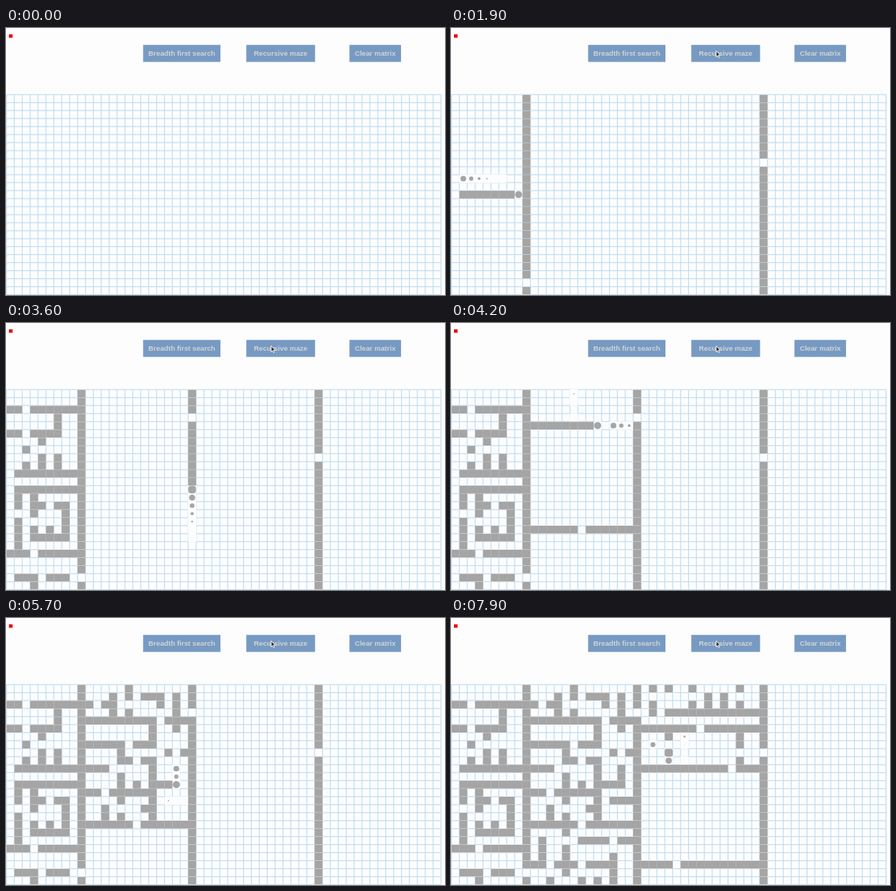
These frames come from a looping animation (600x366 px, 8000 ms). An HTML page:

```html
<!DOCTYPE html>
<html lang="en">
<head>
<meta charset="utf-8">
<title>Recursive maze</title>
<style>
  html, body { margin: 0; width: 100%; height: 100%; overflow: hidden; background: #fdfdfe; }
  svg { display: block; width: 600px; height: 366px; }
  text { font: bold 9.7px "Liberation Sans", Arial, sans-serif; fill: #d2d3d5; text-anchor: middle; }
</style>
</head>
<body>
<svg id="stage" viewBox="0 0 600 366">
  <rect width="600" height="366" fill="#fdfdfe"/>
  <rect x="4" y="8.6" width="5" height="4.8" fill="#f00808"/>
  <g id="buttons"></g>
  <path id="grid" fill="none" stroke="#c1def3" stroke-width="1.25"/>
  <g id="blanks" fill="#fdfdfe"></g>
  <g id="walls" fill="#a5a5a5"></g>
  <path id="cursor" d="M362.3 31.2v8.4l1.9-1.7 1.3 2.8 1.3-.6-1.3-2.7h2.5z"
        fill="#333" stroke="#fff" stroke-width=".9"/>
</svg>
<script>
const LOOP = 8000, STEP = 100, START = 700;
const COLS = 55, ROWS = 25, W = 10.8, H = 10.97, X0 = 0.6, Y0 = 91.3;
const $ = id => document.getElementById(id);

function add(parent, tag, attrs, text) {
  const el = document.createElementNS("http://www.w3.org/2000/svg", tag);
  for (const k in attrs) el.setAttribute(k, attrs[k]);
  if (text) el.textContent = text;
  return parent.appendChild(el);
}

function button(x, width, label) {
  add($("buttons"), "rect", { x, y: 23.2, width, height: 23.3, fill: "#779ac2" });
  add($("buttons"), "text", { x: x + width / 2, y: 38 }, label);
}
button(187.4, 105.7, "Breadth first search");
button(328.4, 94, "Recursive maze");
button(469.4, 70.5, "Clear matrix");

let lines = "";
for (let c = 0; c <= COLS; c++) lines += `M${X0 + c * W} ${Y0}v${ROWS * H}`;
for (let r = 0; r <= ROWS; r++) lines += `M${X0} ${Y0 + r * H}h${COLS * W}`;
$("grid").setAttribute("d", lines);

// Walls in the order they are built; trailing arguments are the gaps.
const cells = [];
const span = (a, b, gaps, put) => {
  for (let i = a; i <= b; i++) if (!gaps.includes(i)) cells.push(put(i));
};
const v = (col, a, b, ...gaps) => span(a, b, gaps, row => [col, row]);
const h = (row, a, b, ...gaps) => span(a, b, gaps, col => [col, row]);
const dot = (col, row) => cells.push([col, row]);
const pause = () => cells.push(null);

v(39, 0, 24, 8);
v(9, 0, 24, 23);

// Left, upper part
h(12, 0, 8, 0);
h(10, 0, 8, 0);
h(2, 0, 8, 2);
v(6, 3, 9, 6, 7);
h(5, 0, 5, 2);
v(4, 6, 9, 7);
v(2, 7, 9, 8);

// Left, lower part
h(20, 0, 8, 3);
v(1, 13, 19, 15);
v(3, 13, 18, 16);
h(18, 4, 7);
v(7, 14, 17);
h(14, 4, 6, 5);
dot(5, 17);
h(23, 1, 7, 4);
dot(3, 24);

// Middle, top
v(23, 0, 24, 3);
h(17, 10, 22, 16);
h(4, 10, 22, 19);
v(15, 0, 3, 2);
h(2, 10, 13, 11);
v(13, 1, 3, 2);
h(1, 17, 19);
dot(19, 2);
v(21, 1, 3);

// Middle, centre
v(18, 5, 16, 8);
h(7, 10, 17, 15);
v(14, 8, 12, 10);
h(10, 10, 12);
h(9, 15, 17, 16);
dot(16, 12);
h(13, 10, 17, 12);
v(14, 14, 16, 15);
v(12, 15, 16);
dot(17, 15);
h(8, 20, 22, 21);
dot(21, 5);
h(12, 19, 21);
v(21, 10, 11);
pause();
h(14, 20, 22);

// Middle, bottom
h(22, 10, 20, 12, 16);
dot(12, 24);
dot(14, 23);
dot(16, 24);
dot(18, 24);
v(20, 23, 24);
v(14, 18, 21, 19);
h(19, 16, 22, 20);
dot(20, 21);
v(11, 19, 21);

// Right
h(22, 24, 38, 28);
h(10, 24, 38, 35);
h(5, 24, 38, 31);
h(3, 25, 38, 26);
v(25, 0, 2, 1);
dot(27, 0);
v(30, 0, 2, 1);
v(32, 1, 2);
v(34, 1, 2);
v(36, 0, 2, 1);
v(36, 6, 9, 8);
v(27, 6, 9, 7);
dot(25, 7);
pause();
v(29, 6, 9, 8);

const parts = cells.map(cell => {
  if (!cell) return null;
  const x = X0 + cell[0] * W, y = Y0 + cell[1] * H;
  return {
    x: x + W / 2, y: y + H / 2,
    blank: add($("blanks"), "rect", { x: x - 0.3, y: y - 0.3, width: W + 0.6, height: H + 0.6 }),
    wall: add($("walls"), "rect", {})
  };
});

// Pace of building: [ms, newest visible cell]
const pace = [[START, 1], [1900, 60], [2900, 108], [3300, 124], [4200, 173],
              [5700, 237], [6600, 279], [7900, 342.5], [LOOP, 347]];

function newest(t) {
  if (t < START) return -9;
  const i = pace.findIndex(p => t < p[0]);
  const [t0, n0] = pace[i - 1], [t1, n1] = pace[i];
  return n0 + (n1 - n0) * (t - t0) / (t1 - t0);
}

function drawCell(p, age) {
  p.blank.style.display = age >= -2.5 ? "" : "none";
  const shown = age > -0.8;
  p.wall.style.display = shown ? "" : "none";
  if (!shown) return;
  const size = Math.min(1, (0.9 + age) / 5.4);
  const w = W * size + (size === 1 ? 0.2 : 0), hh = (H - 0.3) * size;
  const round = Math.max(0, Math.min(1, 5 - age)) * w / 2;
  const a = { x: p.x - w / 2, y: p.y - hh / 2, width: w, height: hh, rx: round, ry: round };
  for (const k in a) p.wall.setAttribute(k, a[k].toFixed(2));
}

function draw(now) {
  const t = Math.floor((now % LOOP) / STEP) * STEP;
  const n = newest(t);
  $("cursor").style.display = t < START ? "none" : "";
  parts.forEach((p, i) => p && drawCell(p, n - i - 1));
}

function tick() {
  draw(performance.now());
  requestAnimationFrame(tick);
}
tick();
</script>
</body>
</html>
```
